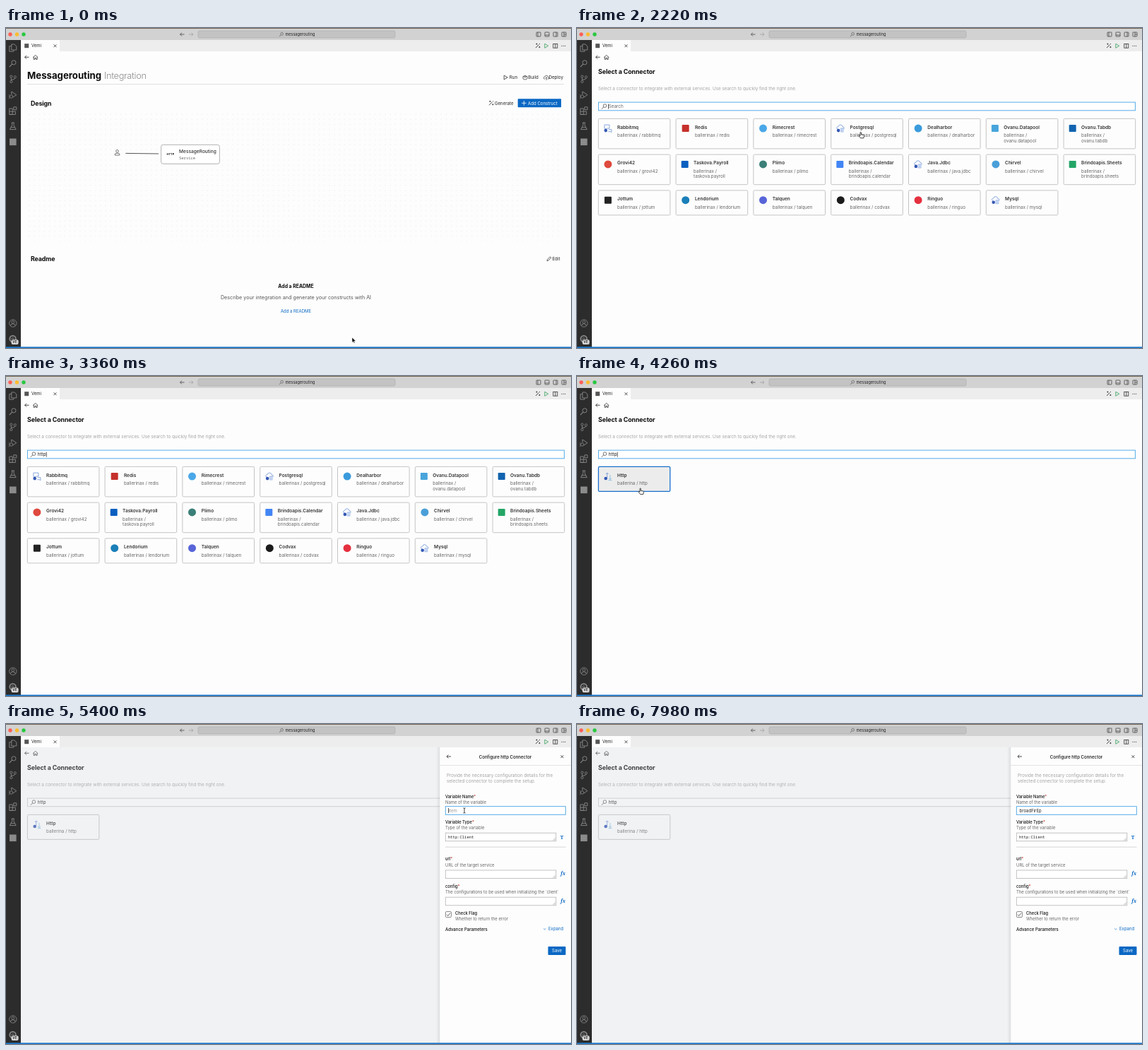
Write an HTML page that moves like this. It is 800 px wide and 453 px high and loops after 8000 ms.

```html
<!DOCTYPE html>
<html lang="en">
<head>
<meta charset="utf-8">
<title>Connector setup</title>
<style>
html, body { margin: 0; width: 100%; height: 100%; overflow: hidden; background: #fdfdfd; }
svg { display: block; position: absolute; left: 0; top: 0; }
text { font-family: Inter, Roboto, sans-serif; white-space: pre; }
.mono { font-family: "Noto Sans Mono", "DejaVu Sans Mono", monospace; }
.serif { font-family: "Noto Serif", "Liberation Serif", serif; }
</style>
</head>
<body>
<svg id="stage" width="800" height="453" viewBox="0 0 800 453"></svg>
<script>
const BLUE = '#0b68c4', FOCUS = '#45a3e6', LOOP = 8000, STEP = 60;

const text = (x, y, s, size, fill = '#222', extra = '') =>
  `<text x="${x}" y="${y}" font-size="${size}" fill="${fill}" ${extra}>${s}</text>`;
const bold = (x, y, s, size, extra = '') => text(x, y, s, size, '#0c0c0c', 'font-weight="700" ' + extra);
const rect = (x, y, w, h, fill, extra = '') =>
  `<rect x="${x}" y="${y}" width="${w}" height="${h}" fill="${fill}" ${extra}/>`;
const line = (d, color = '#333', w = 0.8, extra = '') =>
  `<path d="${d}" fill="none" stroke="${color}" stroke-width="${w}" ${extra}/>`;
const dot = (x, y, r, fill) => `<circle cx="${x}" cy="${y}" r="${r}" fill="${fill}"/>`;
const ring = (x, y, r, color, w = 0.8) =>
  `<circle cx="${x}" cy="${y}" r="${r}" fill="none" stroke="${color}" stroke-width="${w}"/>`;
const group = (id, body, extra = '') => `<g id="${id}" ${extra}>${body}</g>`;
const at = (x, y, body) => `<g transform="translate(${x} ${y})">${body}</g>`;

const lens = (x, y, s, color) =>
  ring(x + s * 0.2, y - s * 0.2, s * 0.55, color, s * 0.16) +
  line(`M${x - s * 0.2} ${y + s * 0.2}l${-s * 0.7} ${s * 0.7}`, color, s * 0.18);
const arrowLeft = (x, y, color = '#222', dir = 1) =>
  line(`M${x + 3 * dir} ${y}h${-6 * dir}m${2.4 * dir} -2.4l${-2.4 * dir} 2.4l${2.4 * dir} 2.4`, color, 0.8);
const cross = (x, y, r = 2) =>
  line(`M${x - r} ${y - r}l${2 * r} ${2 * r}m0 ${-2 * r}l${-2 * r} ${2 * r}`, '#222', 0.8);
const play = (x, y, color) => line(`M${x - 2} ${y - 3}v6l5-3z`, color, 0.8);
const wand = (x, y) => line(`M${x - 3} ${y + 3}l4.4-4.4M${x - 2.6} ${y - 2.4}h2M${x - 1.6} ${y - 3.4}v2M${x + 1.4} ${y + 2}h2M${x + 2.4} ${y + 1}v2M${x + 2} ${y - 2}l1-1`, '#333', 0.9);

function windowBar() {
  const side = (x, d) => at(x, 9, rect(-3, -3, 6, 6, 'none', 'stroke="#444" stroke-width=".8" rx=".6"') + line(d, '#444'));
  return rect(0, 0, 800, 17, '#d2d2d2') + rect(0, 0, 800, 0.9, '#6a5a45') +
    dot(6, 9, 2.7, '#fe5f57') + dot(15.5, 9, 2.7, '#febc2e') + dot(25, 9, 2.7, '#28c840') +
    arrowLeft(249.5, 9, '#444') + arrowLeft(262, 9, '#a0a0a0', -1) +
    rect(272, 4, 279, 10, '#c3c3c3', 'rx="2" stroke="#aaa" stroke-width=".6"') +
    lens(390, 9, 3.4, '#444') + text(395.5, 11, 'messagerouting', 5.5, '#222') +
    side(754, 'M-1-3v6') + side(766, 'M-3 1h6') + side(778, 'M1-3v6') + side(790, 'M0-3v6M0 0h3');
}

function tabBar() {
  return rect(21, 17, 779, 16, '#ededed') + rect(21, 17, 55, 16, '#fdfdfd') +
    rect(26.2, 22.2, 6, 6, '#555') + text(36, 27.3, 'Vemi', 6, '#222') + cross(69.5, 25.3, 1.9) +
    wand(753, 25) + play(764.8, 25.3, '#2f9e57') +
    rect(774.8, 22.4, 6, 5.8, 'none', 'stroke="#333" stroke-width=".8"') + line('M777.8 22.4v5.8') +
    dot(787, 25.3, 0.6, '#333') + dot(789.3, 25.3, 0.6, '#333') + dot(791.6, 25.3, 0.6, '#333') +
    arrowLeft(29.6, 41.3) + line('M38.2 41.6l3.5-3.1 3.5 3.1M39.2 41v3.4h1.7v-2h1.6v2h1.7v-3.4');
}

function sideBar() {
  const c = '#8b8b8b', ic = (y, d) => at(9.8, y, line(d, c, 0.9));
  return rect(0, 17, 21, 436, '#2c2c2c') +
    ic(28, 'M-2-5h4l3 3v5h-7zM-2-2.4h-3v7.6h6v-2') +
    lens(9.8, 50, 5.6, c) +
    ic(72, 'M-2.5-1.7v4M3-1q0 2.2-5.5 2.4') + ring(7.3, 68.6, 1.6, c) + ring(7.3, 76, 1.6, c) + ring(12.8, 69.4, 1.6, c) +
    ic(95, 'M-2-1v-4l7 4.6-5 3.4') + ring(7.4, 97, 2.2, c) + line('M3.8 94.5l1.6 1.2M3.8 97.3h1.4M3.8 100l1.6-1.2', c) +
    ic(117, 'M-5-3h4.4v8.4h-4.4zM-5 1.2h8.6v4.2h-8.6M1-5.2h4v4h-4z') +
    ic(139, 'M-2-5h4M-1.2-5v3.6l-3.2 6h8.8l-3.2-6v-3.6M-2.8 1.6h5.6') +
    rect(5, 156.5, 9.6, 9.6, c) +
    ring(9.8, 418, 5.2, c) + ring(9.8, 416.4, 1.9, c) + ic(418, 'M-3.4 3.7q0-3 3.4-3t3.4 3') +
    ring(9.6, 440, 4.3, c, 1.8) + ring(9.6, 440, 1.5, c) +
    rect(7.6, 441.3, 10, 6.6, '#d8d8d8', 'rx="2"') + text(9.3, 446.4, 'VE', 4.6, '#222', 'font-weight="600"') +
    rect(0, 451.3, 800, 1.7, '#1d77c9');
}

function home() {
  const cloud = line('M764-0', 'none') + line('M763 72.4q-1.9-.3-1.7-2 .3-1.5 1.8-1.4.6-2 2.5-1.7 1.7.3 1.9 2 1.5.2 1.3 1.7-.2 1.3-1.6 1.4M765.2 74v-4M763.7 71.3l1.5-1.5 1.5 1.5', '#333', 0.7);
  return text(30, 72.2, 'Messagerouting', 13.2, '#0c0c0c', 'font-weight="700"') +
    text(139, 72.2, 'Integration', 12.8, '#8c8c8c', 'font-weight="300" letter-spacing="-.33"') +
    rect(30, 79.2, 760, 0.9, '#dcdcdc') +
    play(707.2, 70, '#333') + text(712.8, 72.2, 'Run', 6.2) +
    line('M732 68.8l3-1.6 3 1.6v3l-3 1.4-3-1.4zM732 68.8h6M735 68.8v2', '#333', 0.7) + text(739.3, 72.2, 'Build', 6.2) +
    cloud + text(768.5, 72.2, 'Deploy', 6.2) +
    bold(35, 110.3, 'Design', 8.8, 'letter-spacing="-.08"') +
    wand(687, 106.3) + text(692, 108.6, 'Generate', 6.1) +
    rect(724.7, 100.3, 61.4, 12, BLUE, 'id="add" rx=".8"') +
    line('M730.2 106.3h6.4M733.4 103.1v6.4', '#fff', 0.8) + text(739, 108.6, 'Add Construct', 6.1, '#fff') +
    rect(30, 120, 758, 182, 'url(#dots)') +
    ring(157.5, 174.3, 1.8, '#555') + line('M154.2 180v-1q0-1.7 1.7-1.7h3.2q1.7 0 1.7 1.7v1z', '#555') +
    line('M169.3 177.4L216 178', '#555', 1) +
    rect(219.6, 165.3, 82.8, 27, '#fff', 'rx="3" stroke="#a0a0a0" stroke-width=".8"') +
    text(227.6, 180, 'HTTP', 3.9, '#222', 'font-weight="700"') +
    text(245, 176.8, 'MessageRouting', 6.6, '#333', 'font-weight="500"') +
    text(245, 186, 'Service', 5.5, '#666', 'class="mono"') +
    bold(35, 329.8, 'Readme', 8.8, 'letter-spacing="-.08"') +
    line('M766 329.7l.5-1.9 4-4 1.4 1.4-4 4z', '#333') + text(773.4, 329, 'Edit', 6.2) +
    bold(410.5, 368.1, 'Add a README', 6.9, 'text-anchor="middle"') +
    text(410.5, 384, 'Describe your integration and generate your constructs with AI', 7.2, '#555', 'text-anchor="middle"') +
    text(410.5, 403.2, 'Add a README', 6, BLUE, 'text-anchor="middle"');
}

// name, mark, colour
const CARDS = [
  ['Rabbitmq', 'chat'], ['Redis', 'sq', '#c6302b'], ['Rimecrest', 'ci', '#4aa8e8'], ['Postgresql', 'cloud'],
  ['Dealharbor', 'ci', '#3a9bdc'], ['Ovanu.Datapool', 'sq', '#48a5dc'], ['Ovanu.Tabdb', 'sq', '#1264b0'],
  ['Grovi42', 'ci', '#df4a3e'], ['Taskova.Payroll', 'sq', '#0a5fc0'], ['Plimo', 'ci', '#3a7f78'],
  ['Brindoapis.Calendar', 'sq', '#4285f4'], ['Java.Jdbc', 'cloud'], ['Chirvel', 'ci', '#4a9fd8'],
  ['Brindoapis.Sheets', 'sq', '#23a566'], ['Jottum', 'sq', '#222'], ['Lendorium', 'ci', '#1a7fb8'],
  ['Talquen', 'ci', '#5865d8'], ['Codvax', 'ci', '#1b1b1b'], ['Ringuo', 'ci', '#e5303f'], ['Mysql', 'cloud']
];
const badge = dot(-3.2, 3, 2.3, '#3558b5');
const MARKS = {
  sq: c => rect(-5, -5, 10, 10, c, 'rx="1"'),
  ci: c => dot(0, 0, 5.5, c),
  chat: () => line('M-5-5h7v5h-4l-2 1.6v-1.6h-1zM1 1.6h4v4l-1.6-1h-3', '#6e93d6') + badge,
  cloud: () => line('M-4 1q-2-.6-1.3-2.5.7-1.3 2-1 .8-3 3.6-2.5 2.2.5 2.5 2.7 2.4.2 2.2 2.2-.2 1-1.2 1.2', '#6e93d6') +
    rect(-0.5, -0.5, 5, 6, '#a9c1ea', 'rx="1"') + line('M-.5 1.6h5M-.5 3.6h5', '#fff', 0.6) + badge,
  http: () => line('M-1.2 2v-7M-3.2-3l2-2 2 2', '#6e93d6') + line('M3-2v6.5M1 2.6l2 2 2-2M.5 5.6h5', '#7fb6dc') + badge
};

function card([name, mark, color], i) {
  const x = 30.3 + 109.8 * (i % 7), row = Math.floor(i / 7), y = 128.3 + 50.8 * row;
  const sub = name.toLowerCase(), wrap = sub.length > 10, tx = x + (wrap ? 25 : 26.8);
  const lines = wrap ? ['ballerinax /', sub] : ['ballerinax / ' + sub];
  return rect(x, y, 101.6, row < 2 ? 42.6 : 35, '#fdfdfd', 'rx="1.5" stroke="#c4c4c4"') +
    at(x + (wrap ? 12.6 : 13.6), y + 13.8, MARKS[mark](color)) +
    text(tx, y + 14.2, name, 6.5, '#333', 'font-weight="600"') +
    lines.map((s, k) => text(tx, y + 25.6 + 7.7 * k, s, 6.3, '#666')).join('');
}

function picker() {
  return bold(30, 65.2, 'Select a Connector', 8.8, 'letter-spacing="-.06"') +
    text(30, 88.3, 'Select a connector to integrate with external services. Use search to quickly find the right one.', 6.3, '#a3a3a3') +
    rect(30.4, 105.1, 760, 11.7, '#fff', 'id="box" stroke-width=".9"') + lens(38.6, 111, 4.2, '#333') +
    text(44.8, 113.3, '', 6.3, '#222', 'id="query"') + rect(0, 107.6, 0.7, 7, '#111', 'id="caret1"') +
    group('cards', CARDS.map(card).join('')) +
    group('http', rect(30.4, 128.4, 101.4, 35, '#fdfdfd', 'id="hit" rx="1.5"') + at(43.9, 142, MARKS.http()) +
      text(57, 142.5, 'Http', 6.5, '#333', 'font-weight="600"') + text(57, 154, 'ballerina / http', 6.3, '#666'));
}

function panel() {
  const label = (y, s) => text(622, y, s + '<tspan fill="#c0392b">*</tspan>', 5.8, '#111', 'font-weight="500"');
  const note = (y, s, x = 622) => text(x, y, s, 5.9, '#666');
  const area = y => rect(622.3, y, 156.5, 11.6, '#fff', 'stroke="#b5b5b5" stroke-width=".8"') +
    line(`M774.5 ${y + 10.6}l3.3-3.3M776.3 ${y + 10.6}l1.5-1.5`, '#777', 0.5);
  const fx = y => text(785.2, y, 'fx', 6.8, BLUE, 'class="serif" font-style="italic" font-weight="600"');
  return rect(609, 33, 5.5, 418.3, 'url(#shade)') + rect(614.3, 33, 186, 418.3, '#fdfdfd') +
    arrowLeft(627, 46) + text(707, 48.5, 'Configure http Connector', 6.1, '#111', 'font-weight="500" text-anchor="middle"') +
    cross(787.4, 46.2, 1.9) + rect(614.3, 58.2, 186, 0.8, '#dedede') +
    text(624, 74.8, 'Provide the necessary configuration details for the', 6.3, '#a3a3a3') +
    text(624, 82.8, 'selected connector to complete the setup.', 6.3, '#a3a3a3') +
    label(104.6, 'Variable Name') + note(113.2, 'Name of the variable') +
    rect(622.3, 116.7, 170, 11.6, '#fff', 'id="field" stroke-width=".9"') +
    text(626.6, 124.9, 'item', 6, '#999', 'id="name"') + rect(0, 119, 0.7, 7, '#111', 'id="caret2"') +
    label(140.6, 'Variable Type') + note(149.3, 'Type of the variable') +
    area(154.2) + text(626, 162, 'http:Client', 5.5, '#222', 'class="mono"') +
    text(784.8, 162.6, 'T', 7, BLUE, 'class="serif" font-weight="600"') +
    rect(622, 173.7, 170.5, 0.8, '#ccc') +
    label(193, 'url') + note(202, 'URL of the target service') + area(207) + fx(214.4) +
    label(231.5, 'config') + note(240.2, 'The configurations to be used when initializing the `client`') + area(245.2) + fx(252.6) +
    rect(622.4, 265.6, 8, 8, '#fff', 'rx="1.2" stroke="#666" stroke-width=".8"') + line('M624 269.8l1.7 1.8 3.2-3.9', '#333', 0.8) +
    text(636, 269.9, 'Check Flag', 5.8, '#111', 'font-weight="500"') + note(277.6, 'Whether to return the error', 636) +
    text(622, 292.5, 'Advance Parameters', 6, '#111', 'font-weight="500"') +
    line('M761.2 289.6l1.5 1.4 1.5-1.4', BLUE, 0.7) + text(768, 292.4, 'Expand', 6, BLUE) +
    rect(767.5, 315, 25, 12, BLUE, 'rx="1"') + text(780, 323.2, 'Save', 6, '#fff', 'text-anchor="middle"');
}

const ARROW = '<path d="M0 0v7.4l1.7-1.6 1.1 2.5 1.2-.5-1.1-2.5h2.4z" fill="#000" stroke="#fff" stroke-width=".6"/>';
const HAND = '<path d="M0 .8C0-.4 1.4-.4 1.4.8V3.4L4.6 4C5.4 4.2 5.6 4.8 5.4 5.6L4.8 8.4H.6L-1.8 5.4C-2.3 4.6-1.4 4-.7 4.6L0 5.2Z" fill="#fff" stroke="#111" stroke-width=".8"/>';
const BEAM = line('M-1.5-3.6q1.5 0 1.5 1v5.2q0 1-1.5 1M1.5-3.6q-1.5 0-1.5 1M1.5 3.6q-1.5 0-1.5-1', '#111', 0.8);

document.getElementById('stage').innerHTML = `<defs>
  <pattern id="dots" x="32" y="121" width="7.2" height="7.2" patternUnits="userSpaceOnUse">${dot(1, 1, 0.5, '#dedede')}</pattern>
  <linearGradient id="shade"><stop offset="0" stop-color="#000" stop-opacity="0"/><stop offset="1" stop-color="#000" stop-opacity=".09"/></linearGradient></defs>` +
  rect(0, 0, 800, 453, '#fdfdfd') + windowBar() + tabBar() +
  group('home', home()) + group('picker', picker()) +
  rect(21, 33, 779, 418.3, '#ccd2d9', 'id="veil"') + group('panel', panel()) + sideBar() +
  group('pointer', group('arrow', ARROW) + group('hand', HAND) + group('beam', BEAM));

const $ = {};
document.querySelectorAll('[id]').forEach(el => $[el.id] = el);
const show = (el, on) => el.setAttribute('display', on ? 'inline' : 'none');
const set = (el, o) => { for (const k in o) el.setAttribute(k, o[k]); };

// time, x, y of the pointer
const PATH = [[0, 490, 438], [120, 743, 95], [300, 743, 95], [480, 754, 109], [1800, 754, 109],
  [2340, 350, 153], [3660, 350, 153], [4020, 89, 159], [4740, 89, 159], [5220, 649, 122.5], [8000, 649, 122.5]];
const T = { hover: 420, list: 1980, query: 2880, found: 3420, aim: 3960, open: 4500, opened: 4740, focus: 5280, name: 5580, tail: 7140 };
const QUERY = 'http', NAME = 'broadFirEp', HEAD = 8;

function pointerAt(t) {
  let i = 1;
  while (t > PATH[i][0]) i++;
  const [t0, x0, y0] = PATH[i - 1], [t1, x1, y1] = PATH[i], k = (t - t0) / (t1 - t0);
  const e = t0 ? k * k * (3 - 2 * k) : k;
  return [x0 + (x1 - x0) * e, y0 + (y1 - y0) * e];
}
const typed = (t, start, gap, n) => t < start ? 0 : Math.min(n, Math.floor((t - start) / gap) + 1);
const blink = (t, since) => (t - since) % 1000 < 500;

function draw(t) {
  const listed = t >= T.list, open = t >= T.open;
  show($.home, !listed);
  show($.picker, listed);
  $.add.setAttribute('fill', t >= T.hover ? '#0a5496' : BLUE);

  const q = typed(t, T.query, 120, QUERY.length);
  $.query.textContent = q ? QUERY.slice(0, q) : 'Search';
  $.query.setAttribute('fill', q ? '#222' : '#666');
  $.box.setAttribute('stroke', open ? '#c8c8c8' : FOCUS);
  $.caret1.setAttribute('x', 44.8 + (q ? $.query.getComputedTextLength() + 0.3 : -0.5));
  show($.caret1, listed && !open && blink(t, q ? T.query + 120 * (q - 1) : T.list));
  show($.cards, t < T.found);
  show($.http, t >= T.found);
  const aimed = t >= T.aim && !open;
  set($.hit, { fill: aimed ? '#ececec' : '#fdfdfd', stroke: aimed ? '#1870cc' : '#c4c4c4', 'stroke-width': aimed ? 1.3 : 1 });

  const k = Math.min(1, Math.max(0, (t - T.open) / (T.opened - T.open))), slide = 1 - (1 - k) ** 2;
  show($.veil, open);
  show($.panel, open);
  $.veil.setAttribute('opacity', 0.27 * slide);
  $.panel.setAttribute('transform', `translate(${192 * (1 - slide)} 0)`);

  const head = typed(t, T.name, 120, HEAD), n = head + typed(t, T.tail, 180, NAME.length - HEAD);
  const last = n > HEAD ? T.tail + 180 * (n - HEAD - 1) : n ? T.name + 120 * (n - 1) : T.focus;
  const focused = t >= T.focus;
  $.name.textContent = n ? NAME.slice(0, n) : 'item';
  $.name.setAttribute('fill', n ? '#222' : '#999');
  $.field.setAttribute('stroke', focused ? FOCUS : '#c0c0c0');
  $.caret2.setAttribute('x', 626.6 + (n ? $.name.getComputedTextLength() + 0.3 : -0.5));
  show($.caret2, focused && blink(t, last));

  const [x, y] = pointerAt(t);
  const beam = t >= 5160, hand = !beam && (t >= T.hover && t < 4860);
  $.pointer.setAttribute('transform', `translate(${x} ${y})`);
  show($.pointer, !(t >= T.query && t < 3660) && t < T.name);
  show($.beam, beam);
  show($.hand, hand);
  show($.arrow, !beam && !hand);
}

const start = performance.now();
function tick() {
  const t = (performance.now() - start) % LOOP;
  draw(Math.floor(t / STEP) * STEP);
  requestAnimationFrame(tick);
}
tick();
</script>
</body>
</html>
```
